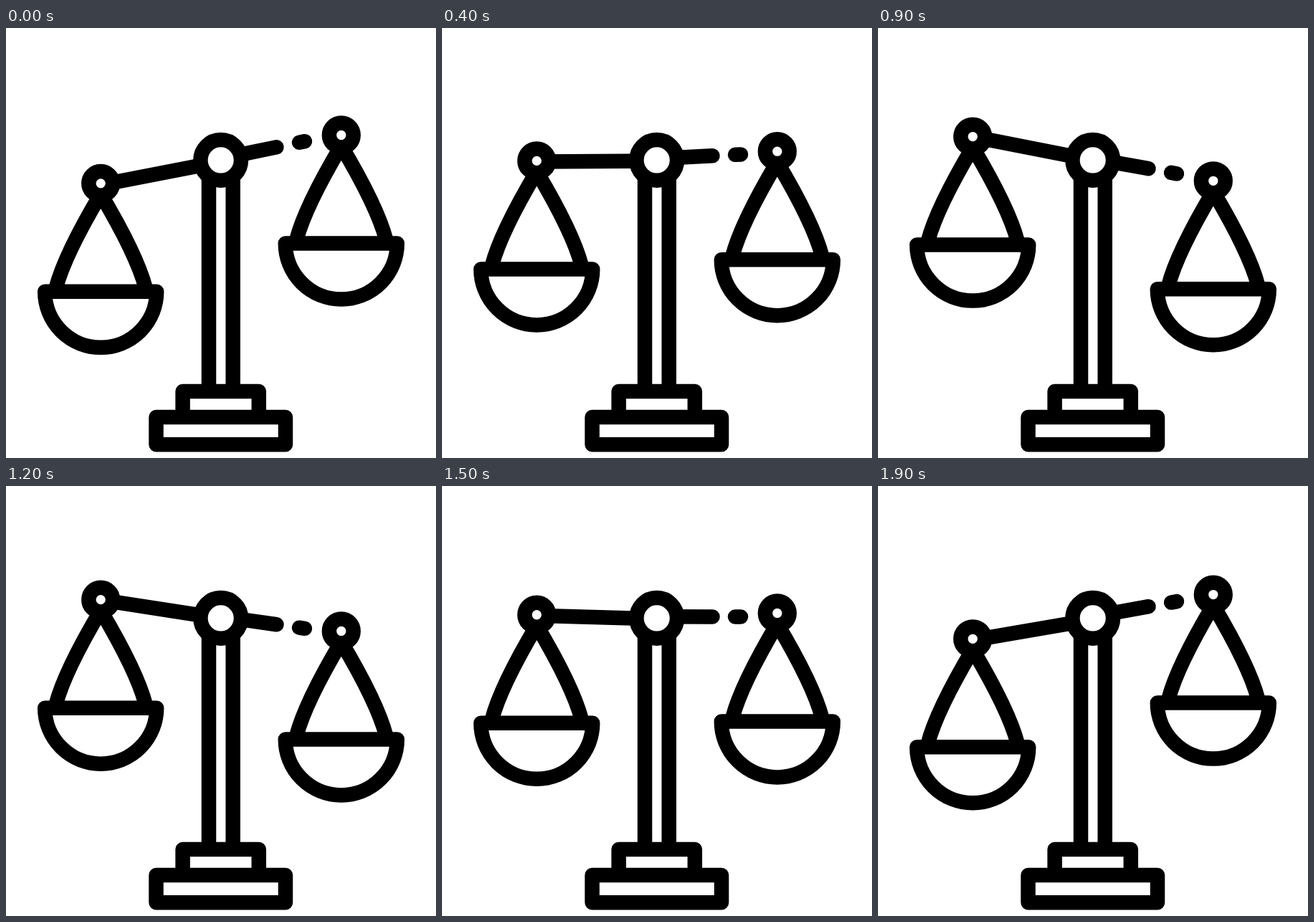
Recreate the animation shown at these times as an HTML page with a canvas. Size 600 by 600 pixels, loop 2000 ms.

```html
<!DOCTYPE html>
<html lang="en">
<head>
<meta charset="utf-8">
<title>Balance scales</title>
<style>
  html, body { margin: 0; width: 100%; height: 100%; overflow: hidden; background: #fff; }
  canvas { display: block; width: 600px; height: 600px; }
</style>
</head>
<body>
<canvas id="stage" width="600" height="600"></canvas>
<script>
const ctx = document.getElementById('stage').getContext('2d');
const LOOP = 2000, STEP = 100, LINE = 20.5;
const HUB = { x: 299.7, y: 184.4 };
const LEFT_X = 132.2, RIGHT_X = 467.8;

// Triangle wave with rounded tips: 1 when the left pan is lowest, -1 when it is highest
function swing(time) {
  const sharp = 0.97;
  const wave = Math.cos((time + 15) / LOOP * Math.PI * 2);
  return Math.asin(sharp * wave) / Math.asin(sharp);
}

function line(points, close) {
  ctx.beginPath();
  points.forEach(([x, y]) => ctx.lineTo(x, y));
  if (close) ctx.closePath();
  ctx.stroke();
}

function ring(x, y, r) {
  ctx.beginPath();
  ctx.arc(x, y, r, 0, Math.PI * 2);
  ctx.fill();
  ctx.stroke();
}

function pan(x, y) {
  ctx.lineCap = 'butt';
  for (const side of [-1, 1]) {
    ctx.beginPath();
    ctx.moveTo(x, y + 15);
    ctx.quadraticCurveTo(x + side * 50.5, y + 100, x + side * 62.5, y + 146);
    ctx.stroke();
  }
  ctx.beginPath();
  ctx.arc(x, y + 151, 78, 0, Math.PI);
  ctx.closePath();
  ctx.stroke();
  ring(x, y, 16.9);
}

function stand() {
  ctx.lineCap = 'butt';
  line([[283, 190], [283, 507]]);
  line([[316.7, 190], [316.7, 507]]);
  line([[246.6, 543], [246.6, 507], [352.8, 507], [352.8, 543]]);
  line([[209.5, 543], [390, 543], [390, 581.3], [209.5, 581.3]], true);
}

function rightArm(slope) {
  const at = x => [x, 182.2 + slope * (x - HUB.x)];
  ctx.lineCap = 'round';
  line([at(310), at(377.5)]);
  line([at(409), at(417)]);
}

function draw(time) {
  const tilt = swing(time);
  const middle = 178.6 + 4.6 * tilt * tilt;
  const leftY = middle + 33.8 * tilt;
  const rightY = middle - 33.8 * tilt;
  const sag = 1 + tilt;

  ctx.fillStyle = '#fff';
  ctx.strokeStyle = '#000';
  ctx.lineWidth = LINE;
  ctx.lineJoin = 'round';
  ctx.fillRect(0, 0, 600, 600);
  stand();
  line([[LEFT_X, leftY + sag], [HUB.x, HUB.y + sag]]);
  rightArm(-0.205 * swing(time - 20)); // trails the pans slightly
  pan(LEFT_X, leftY);
  pan(RIGHT_X, rightY);
  ring(HUB.x, HUB.y, 28.3);
}

const start = performance.now();
function tick() {
  const time = (performance.now() - start) % LOOP;
  draw(Math.floor(time / STEP) * STEP);
  requestAnimationFrame(tick);
}
tick();
</script>
</body>
</html>
```
